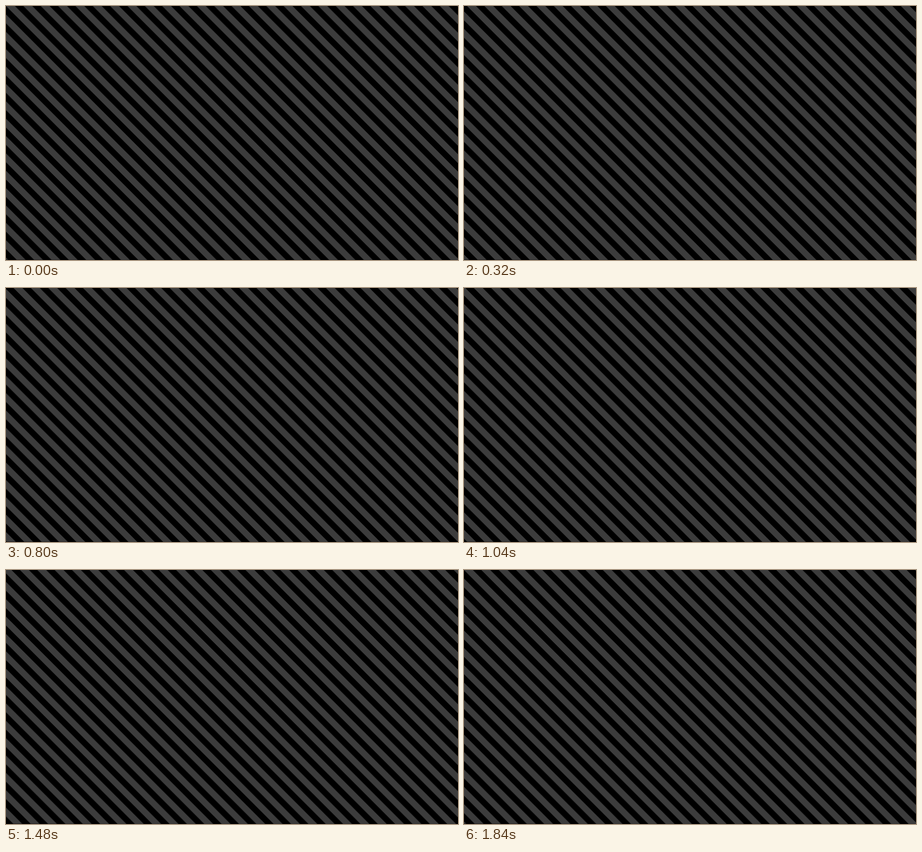
An HTML page that plays this animation: 800 px wide and 450 px high, repeating every 1880 ms.

```html
<!DOCTYPE html>
<html lang="en">
<head>
<meta charset="utf-8">
<title>Diagonal stripes</title>
<style>
  html, body {
    margin: 0;
    width: 100%;
    height: 100%;
    overflow: hidden;
    background: #000;
  }
  svg {
    display: block;
    width: 800px;
    height: 450px;
  }
  /* 47 poses of 40 ms, first and last one full stripe period apart */
  .stripes, .edge {
    animation: drift 1880ms steps(47, jump-none) infinite;
  }
  .stripes line {
    stroke: #3c3c3c;
    stroke-width: 450;
    stroke-dasharray: 15.75 14.96;
  }
  .edge { fill: #0c0404; }
  @keyframes drift {
    from { transform: translateX(0); }
    to { transform: translateX(30.71px); }
  }
</style>
</head>
<body>
<svg viewBox="0 0 800 450">
  <g class="stripes">
    <!-- starts 17 periods left of the stage -->
    <line x1="-522.07" y1="225" x2="830" y2="225" transform="skewX(44.95)"/>
  </g>
  <!-- slightly tilted lower edge -->
  <path class="edge" d="M-40 449.4L162 450H-40Z"/>
</svg>
</body>
</html>
```
